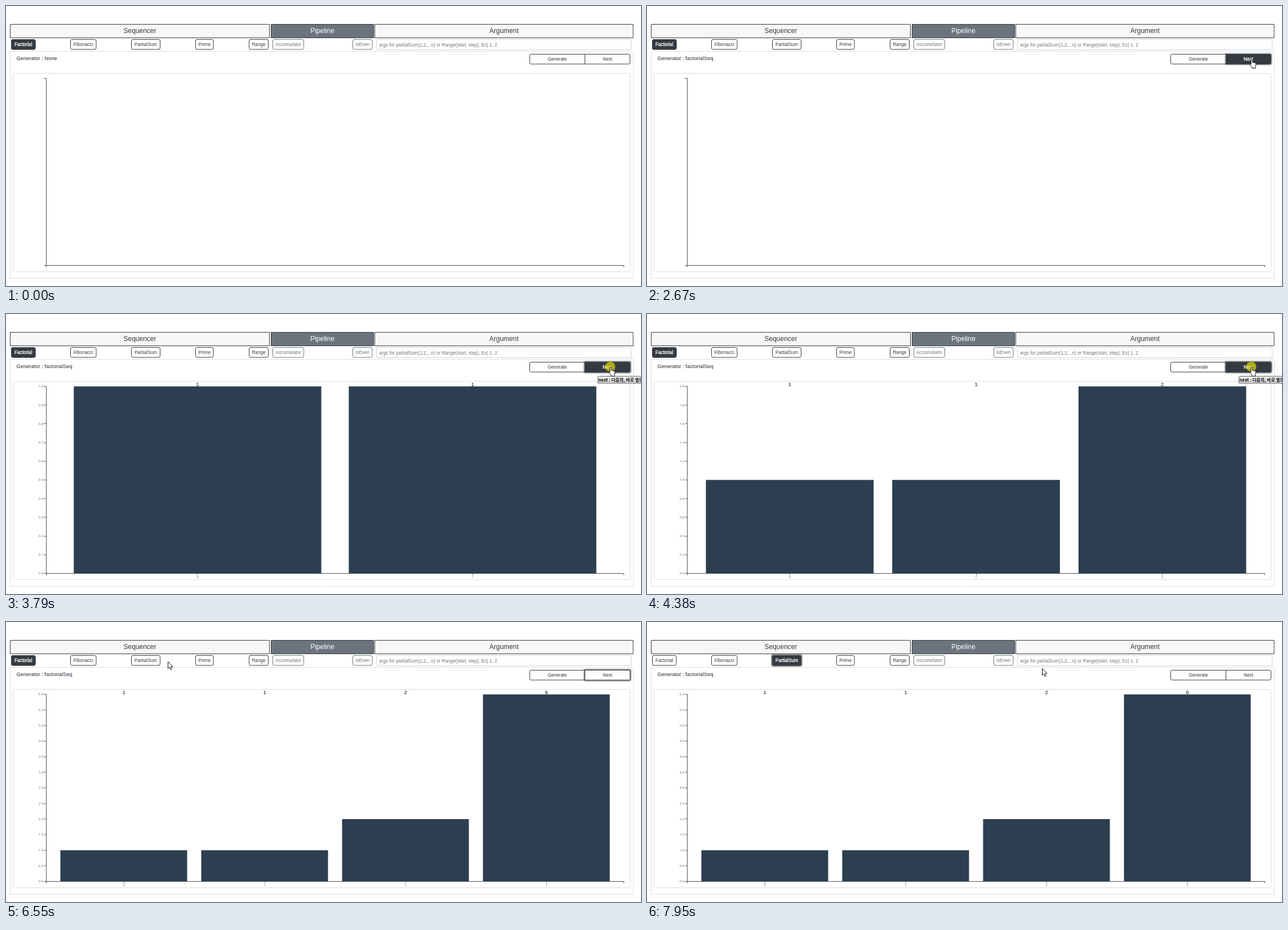
Animation of 1127x497 px, one loop 8000 ms. Source, as an HTML page with a canvas:

```html
<!DOCTYPE html>
<html lang="en">
<head>
<meta charset="utf-8">
<title>Sequence generator</title>
<style>
html, body { margin: 0; width: 100%; height: 100%; overflow: hidden; background: #fff; }
canvas { display: block; }
</style>
</head>
<body>
<canvas id="stage" width="1127" height="497"></canvas>
<script>
const c = document.getElementById('stage').getContext('2d');
const LOOP = 8000, FADE = 150;
const DARK = '#343a40', GRAY = '#6c757d', LINE = '#dfdfdf', BAR = '#2c3e50';
const SANS = '"Liberation Sans", Arial, sans-serif';

// Pointer path: time, x, y of the hot spot
const path = [
  [150, 1053, 484], [620, 972, 112], [720, 965, 92],
  [1770, 965, 92], [2160, 1073, 94],
  [4860, 1073, 94], [5010, 900, 122], [5190, 480, 108], [5340, 184, 86],
  [5400, 197, 82], [5570, 214, 73], [5700, 250, 65],
  [6120, 250, 65], [6280, 276, 71], [6510, 276, 71], [6550, 287, 70],
  [6780, 352, 72], [6850, 352, 72], [7150, 250, 66],
  [7500, 250, 66], [7730, 480, 88], [7920, 701, 82]
];
const clicks = [[1330, 1460], [2580, 2670], [3230, 3330], [3790, 3870], [4350, 4430], [7390, 7480]];
const charts = [2720, 3370, 3870, 4430];
const values = [1, 1, 2, 6];
const tickSteps = { 1: 0.1, 2: 0.2, 6: 0.5 };

const button = (label, x, y, w, opts) =>
  ({ label, x, y, w, h: 17.5, color: DARK, radius: 2.5, focus: [0, 0], on: () => false, ...opts });
const buttons = [
  button('Factorial', 9.5, 59.5, 42.5, { on: t => t < 7470 }),
  button('Fibonacci', 114.5, 59.5, 45.5),
  button('PartialSum', 222.5, 59.5, 51, { focus: [7390, LOOP], on: t => t >= 7390 }),
  button('Prime', 336.5, 59.5, 31.5),
  button('Range', 431.5, 59.5, 34),
  button('Accumulator', 473.5, 59.5, 55, { color: GRAY }),
  button('isEven', 615.5, 59.5, 34.5, { color: GRAY }),
  button('Generate', 929.5, 85.5, 98, { radius: [2.5, 0, 0, 2.5], focus: [1330, 2580] }),
  button('Next', 1027.5, 85.5, 80, { radius: [0, 2.5, 2.5, 0], focus: [2580, 7390] })
];

const arrow = new Path2D('M0 0V12.2L2.8 9.6 4.8 14 6.8 13.1 4.9 8.8H8.6Z');
const hand = new Path2D('M-1.4 9V.6a1.3 1.3 0 0 1 2.6 0V5.4L5.8 6.5Q7.3 7 7.2 8.8L6.3 13V15.8H.2V13.8L-3.6 9.6Q-4 7.9-2.5 8Z');

const within = (t, [a, b]) => t >= a && t < b;
const clamp = v => Math.max(0, Math.min(1, v));

function pointer(t) {
  if (t < path[0][0]) return null;
  let i = 0;
  while (i < path.length - 2 && t >= path[i + 1][0]) i++;
  const [t0, x0, y0] = path[i], [t1, x1, y1] = path[i + 1];
  const k = clamp((t - t0) / (t1 - t0)), e = k * k * (3 - 2 * k);
  return { x: x0 + (x1 - x0) * e, y: y0 + (y1 - y0) * e };
}

const hit = (b, p) => p && p.x > b.x && p.x < b.x + b.w && p.y > b.y && p.y < b.y + b.h;

// Share of the last FADE ms spent over the button, which eases the hover colour
function hover(b, t) {
  let n = 0;
  for (let k = 0; k < 10; k++) if (hit(b, pointer(t - FADE * k / 10))) n++;
  return n / 10;
}

function text(s, x, y, size, color, align = 'left', family = SANS, weight = '') {
  c.font = `${weight} ${size}px ${family}`;
  c.textAlign = align;
  c.fillStyle = color;
  c.fillText(s, x, y);
}

function box(x, y, w, h, stroke, fill, radius = 0) {
  c.beginPath();
  c.roundRect(x, y, w, h, radius);
  if (fill) { c.fillStyle = fill; c.fill(); }
  c.strokeStyle = stroke;
  c.stroke();
}

function lines(...runs) {
  c.beginPath();
  for (const [start, ...rest] of runs) {
    c.moveTo(...start);
    for (const p of rest) c.lineTo(...p);
  }
  c.stroke();
}

function drawButton(b, t) {
  const level = b.on(t) ? 1 : hover(b, t), cx = b.x + b.w / 2;
  if (within(t, b.focus)) {
    const k = clamp((t - b.focus[0]) / FADE);
    c.beginPath();
    c.roundRect(b.x - 2.5, b.y - 2.5, b.w + 5, b.h + 5, 4);
    c.fillStyle = `rgba(52,58,64,${0.5 * k})`;
    c.fill();
  }
  box(b.x, b.y, b.w, b.h, b.color, '#fff', b.radius);
  c.globalAlpha = level;
  box(b.x, b.y, b.w, b.h, b.color, b.color, b.radius);
  c.globalAlpha = 1;
  text(b.label, cx, b.y + 11.7, 8.2, level > 0.5 ? '#fff' : b.color, 'center');
  if (level > 0.5) {
    c.strokeStyle = '#fff';
    c.lineWidth = 0.3;
    c.strokeText(b.label, cx, b.y + 11.7);
    c.lineWidth = 1;
  }
}

function drawHeader(label, x, w, fill, color) {
  box(x, 32.5, w, 24, DARK, fill);
  text(label, x + w / 2, 48.3, 12, color, 'center');
}

function drawChart(n) {
  const left = 71.5, right = 1096.5, top = 128.5, base = 460.5;
  if (n) {
    const max = values[n - 1], unit = tickSteps[max];
    const step = (right - left) / (n + 0.1), band = step * 0.9;
    const tickFont = '"Open Sans", sans-serif';
    c.strokeStyle = '#555';
    for (let i = 0; i <= Math.round(max / unit); i++) {
      const y = base - (base - top) * i * unit / max, line = Math.floor(y) + 0.5;
      lines([[67.5, line], [left, line]]);
      text((i * unit).toFixed(1), 66.3, y + 1.8, 6, '#666', 'right', tickFont);
    }
    for (let i = 0; i < n; i++) {
      const x = left + step * (i + 0.1), mid = x + band / 2, h = (base - top) * values[i] / max;
      c.fillStyle = BAR;
      c.fillRect(x, base - h, band, h);
      lines([[Math.floor(mid) + 0.5, base], [Math.floor(mid) + 0.5, 463.5]]);
      text(i, mid, 469.2, 6, '#666', 'center', tickFont);
      text(values[i], mid, 128.2, 9.33, '#111', 'center');
    }
  }
  c.strokeStyle = '#4a4f57';
  lines([[67.5, top], [left, top], [left, base], [67.5, base]],
        [[left, 463.5], [left, base], [right, base], [right, 463.5]]);
}

function drawTooltip() {
  const g = c.createLinearGradient(0, 110, 0, 124);
  g.addColorStop(0, '#f8f8f8');
  g.addColorStop(1, '#cacaca');
  box(1050.5, 110.5, 90, 12.5, '#666', g, 1);
  text('next : 다음의, 바로 옆의', 1051.5, 120, 7.8, '#111', 'left',
    '"Noto Sans CJK KR", "Noto Sans CJK", sans-serif', 'bold');
}

function drawPointer(t) {
  const p = pointer(t);
  if (!p) return;
  if (clicks.some(k => within(t, k))) {
    c.fillStyle = 'rgba(220,215,0,.7)';
    c.beginPath();
    c.arc(p.x - 0.5, p.y - 0.5, 9, 0, 7);
    c.fill();
  }
  const shape = buttons.some(b => hit(b, p)) ? hand : arrow;
  c.save();
  c.translate(p.x + 0.5, p.y + 0.5);
  c.fillStyle = '#fff';
  c.strokeStyle = '#111';
  c.fill(shape);
  c.stroke(shape);
  c.restore();
}

function draw(t) {
  c.lineWidth = 1;
  c.fillStyle = '#fff';
  c.fillRect(0, 0, 1127, 497);
  box(7.5, 80.5, 1106, 403, LINE);
  box(12.5, 119.5, 1095, 352, LINE, null, 2);
  drawHeader('Sequencer', 7.5, 460, '#f7f7f7', DARK);
  drawHeader('Pipeline', 470.5, 182, GRAY, '#fff');
  drawHeader('Argument', 654.5, 458.5, '#f7f7f7', DARK);
  box(657.5, 59.5, 452, 18, '#ced4da');
  text('args for partialSum(1,2,...n) or Range(start, step), Ex) 1, 2', 662, 71.7, 8.2, GRAY);
  text('Generator : ' + (t < 1420 ? 'None' : 'factorialSeq'), 18.6, 96, 9.33, '#212b38');
  drawChart(charts.filter(at => t >= at).length);
  const focused = b => within(t, b.focus) || hover(b, t) > 0;
  for (const b of [...buttons].sort((a, d) => focused(a) - focused(d))) drawButton(b, t);
  if (within(t, [2720, 4930])) drawTooltip();
  drawPointer(t);
}

const start = performance.now();
function frame() {
  draw((performance.now() - start) % LOOP);
  requestAnimationFrame(frame);
}
frame();
</script>
</body>
</html>
```
